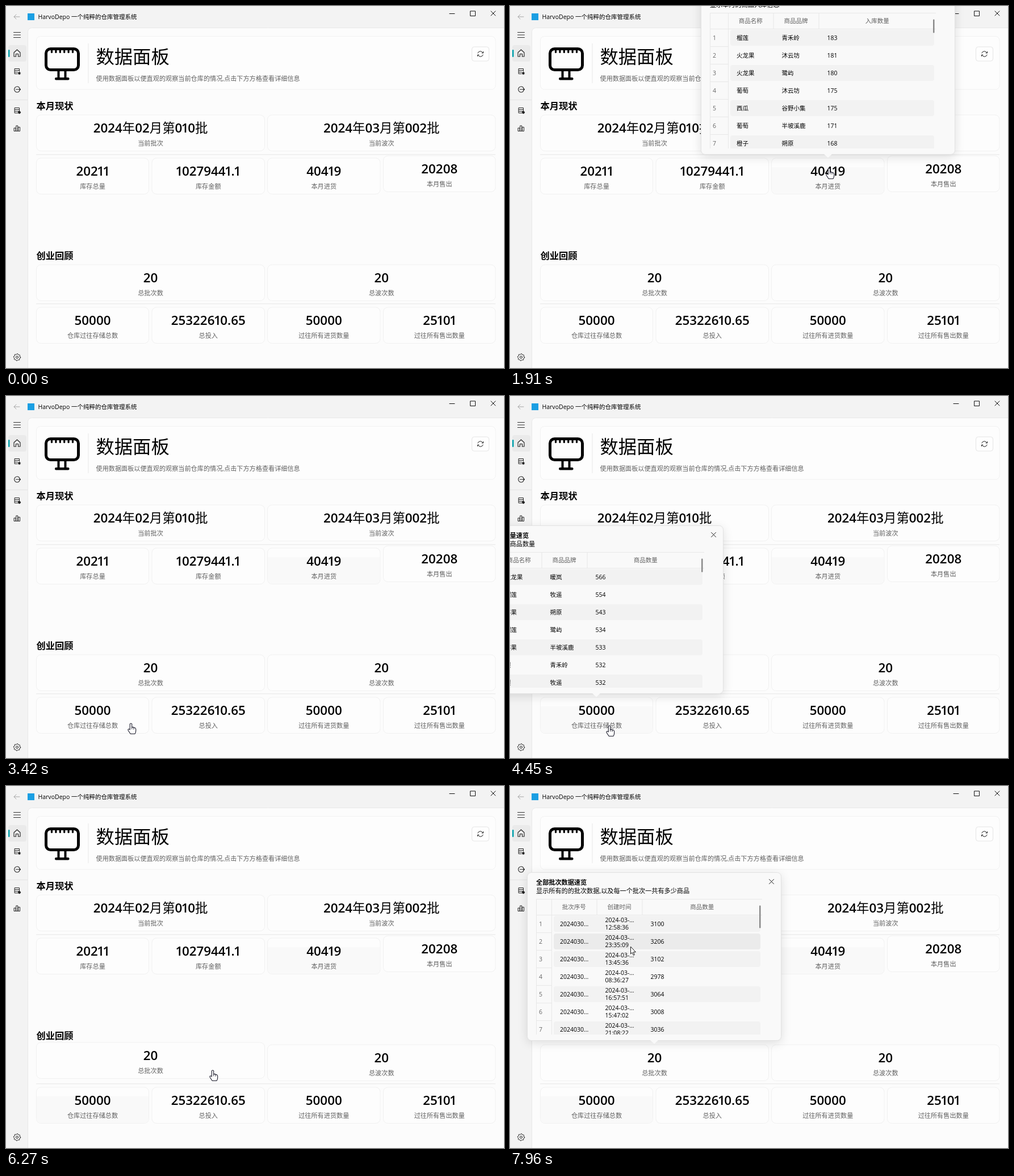
An HTML page with a canvas that plays this animation: 877 px wide and 638 px high, repeating every 8 s.

```html
<!DOCTYPE html>
<html lang="zh-CN">
<head>
<meta charset="utf-8">
<title>仓库面板</title>
<style>
html, body { margin: 0; width: 100%; height: 100%; overflow: hidden; background: #f3f3f3; }
canvas { display: block; }
</style>
</head>
<body>
<canvas id="stage" width="877" height="638"></canvas>
<script>
const ctx = document.getElementById('stage').getContext('2d');
const LOOP = 8000;
const FONT = '"Open Sans", "Noto Sans CJK SC", "Noto Sans CJK", sans-serif';
const GREY = '#606060';

const clamp = v => Math.max(0, Math.min(1, v));
const smooth = u => u * u * (3 - 2 * u);
const within = (x, y, bx, by, w, h) => x >= bx && x < bx + w && y >= by && y < by + h;

// ---- data ----
const card = (x, y, w, value, label, extra) => ({ x, y, w, h: 63.5, value, label, base: 0, ...extra });
const cards = [
  card(53.5, 192, 402, '2024年02月第010批', '当前批次', { lift: [5710, 5880] }),
  card(460.5, 192, 401.5, '2024年03月第002批', '当前波次'),
  card(53.5, 268, 198, '20211', '库存总量'),
  card(257, 268, 198.5, '10279441.1', '库存金额'),
  card(460.5, 268, 198.5, '40419', '本月进货', { lift: [1300, 1730], shade: [1300, LOOP, 16] }),
  card(664.5, 268, 197.5, '20208', '本月售出', { base: 4 }),
  card(53.5, 456, 402, '20', '总批次数', { lift: [6110, 6420], shade: [6420, 7010, 5] }),
  card(460.5, 456, 401.5, '20', '总波次数'),
  card(53.5, 531, 198, '50000', '仓库过往存储总数', { lift: [3440, 4270], shade: [4030, LOOP, 16] }),
  card(257, 531, 198.5, '25322610.65', '总投入'),
  card(460.5, 531, 198.5, '50000', '过往所有进货数量'),
  card(664.5, 531, 197.5, '25101', '过往所有售出数量')
];

const split = s => s.split(' ').map(r => r.split('|'));
const popups = [
  {
    x: 336, y: -35, from: 1725, to: 3040, side: 48, thumb: 24,
    title: '本月进货数据速览', note: '显示本月的商品入库信息',
    heads: ['商品名称', '商品品牌', '入库数量'],
    rows: split('榴莲|青禾岭|183 火龙果|沐云坊|181 火龙果|鹭屿|180 葡萄|沐云坊|175 西瓜|谷野小集|175 葡萄|半坡溪鹿|171 橙子|朔原|168')
  },
  {
    x: -72, y: 228, from: 4265, to: 5710, side: 48, thumb: 24,
    title: '仓库存储数量速览', note: '显示仓库的商品数量',
    heads: ['商品名称', '商品品牌', '商品数量'],
    rows: split('火龙果|暖岚|566 榴莲|牧遥|554 苹果|朔原|543 榴莲|鹭屿|534 苹果|半坡溪鹿|533 梨|青禾岭|532 梨|牧遥|532')
  },
  {
    x: 30, y: 152, from: 6415, to: LOOP, side: 43, thumb: 40,
    title: '全部批次数据速览', note: '显示所有的的批次数据,以及每一个批次一共有多少商品',
    heads: ['批次序号', '创建时间', '商品数量'],
    rows: split('12:58:36|3100 23:35:09|3206 13:45:36|3102 08:36:27|2978 16:57:51|3064 15:47:02|3008 21:08:22|3036')
      .map(([time, n]) => ['2024030...', '2024-03-...\n' + time, n])
  }
];
const PW = 448, PH = 297;

// start, end, then the three points of a curve
const moves = [
  [360, 930, 676, 640, 405, 490, 555, 350],
  [1230, 1420, 555, 350, 566, 318, 562, 286],
  [2250, 2620, 562, 286, 640, 90, 768, 3],
  [3040, 3420, 768, 3, 520, 330, 220, 577],
  [3430, 3610, 220, 577, 200, 600, 175, 581],
  [4880, 5580, 175, 581, 375, 510, 355, 240],
  [5710, 6270, 356, 240, 515, 360, 364, 501],
  [6980, 7770, 364, 501, 362, 330, 201, 241],
  [7860, 7960, 201, 241, 204, 262, 212, 283]
];

// ---- drawing helpers ----
function text(s, x, cy, size, color = '#000', align = 'left', weight = 400) {
  ctx.font = `${weight} ${size}px ${FONT}`;
  ctx.fillStyle = color;
  ctx.textAlign = align;
  ctx.fillText(s, x, cy + size * 0.37);
}

function box(x, y, w, h, r, fill, stroke) {
  ctx.beginPath();
  ctx.roundRect(x, y, w, h, r);
  if (fill) { ctx.fillStyle = fill; ctx.fill(); }
  if (stroke) { ctx.strokeStyle = stroke; ctx.lineWidth = 1; ctx.stroke(); }
}

function bar(x, y, w, h, fill) {
  ctx.fillStyle = fill;
  ctx.fillRect(x, y, w, h);
}

function path(d, x, y, stroke, width = 1, fill) {
  const p = new Path2D(d);
  ctx.save();
  ctx.translate(x, y);
  ctx.lineJoin = ctx.lineCap = 'round';
  if (fill) { ctx.fillStyle = fill; ctx.fill(p); }
  if (stroke) { ctx.strokeStyle = stroke; ctx.lineWidth = width; ctx.stroke(p); }
  ctx.restore();
}

// Proportional figures: a narrow 1, lighter ideographs
function figures(s, cx, cy) {
  const size = 22.4;
  const glyphs = [...s].map(ch => {
    const font = `${ch > '~' ? 500 : 600} ${size}px ${FONT}`;
    ctx.font = font;
    return { ch, font, w: ctx.measureText(ch).width * (ch === '1' ? 0.77 : 1) };
  });
  let x = cx - glyphs.reduce((sum, g) => sum + g.w, 0) / 2;
  ctx.fillStyle = '#000';
  ctx.textAlign = 'center';
  for (const g of glyphs) {
    ctx.font = g.font;
    ctx.fillText(g.ch, x + g.w / 2, cy + size * 0.36);
    x += g.w;
  }
}

// ---- window ----
function gear(x, y, r, fill) {
  let d = '';
  for (let i = 0; i < 32; i++) {
    const a = i / 32 * Math.PI * 2, k = i % 4 < 2 ? r : r * 0.8;
    d += (i ? 'L' : 'M') + (Math.cos(a) * k).toFixed(2) + ' ' + (Math.sin(a) * k).toFixed(2);
  }
  path(d + 'Z', x, y, '#222', 1, fill);
}

function stack(y) {
  path('M-4.5-4.5H3.5V4.5H-4.5ZM-4.5-1.5H3.5M-4.5 1.5H3.5', 20, y, '#222');
}

function sidebar() {
  path('M5 0H-5M-1-4L-5 0L-1 4', 19, 19, '#a5a5a5');
  path('M-6-4.5H6M-6 0H6M-6 4.5H6', 19.5, 51, '#333');
  box(4, 69, 32, 29, 4, '#eaeaea');
  box(4, 77, 2.5, 13, 1.2, '#009faa');
  path('M-5.5-1L0-6L5.5-1V6H2V1.5H-2V6H-5.5Z', 19.5, 83, '#222', 1.1);
  stack(115);
  path('M2.8 0A2.8 2.8 0 1 1-2.8 0A2.8 2.8 0 1 1 2.8 0Z', 23.5, 118.5, '#f3f3f3', 1, '#222');
  path('M4-3.2A5 5 0 1 0 4 3.2M-2 0H6M4-2L6 0L4 2', 19.5, 147, '#222', 1.1);
  bar(0, 165, 38, 1, '#e3e3e3');
  stack(184);
  gear(23.5, 187.5, 2.2, '#222');
  path('M-5-1H-2.4V4.5H-5ZM-1.3-5H1.3V4.5H-1.3ZM2.4-2.5H5V4.5H2.4Z', 19.5, 216, '#222');
  gear(19.5, 619, 6.2);
  path('M2 0A2 2 0 1 1-2 0A2 2 0 1 1 2 0Z', 19.5, 619, '#222');
}

function monitor() {
  ctx.strokeStyle = '#000';
  ctx.lineWidth = 5;
  ctx.beginPath();
  ctx.roundRect(70.5, 75.5, 57, 37, 8);
  ctx.stroke();
  for (let i = 0; i < 6; i++) path('M0 0V5', 80.5 + i * 7.4, 76.5, '#000', 3.2);
  bar(90.5, 113, 4, 15, '#000');
  bar(102.5, 113, 4, 15, '#000');
  box(86, 126, 25.5, 4.5, 2, '#000');
}

function chrome() {
  bar(0, 0, 877, 638, '#f3f3f3');
  box(38.5, 38.5, 860, 620, 7, '#fcfcfc', '#e9e9e9');
  bar(38, 13, 12, 12, '#1b9fe3');
  text('HarvoDepo 一个纯粹的仓库管理系统', 56.5, 19, 10.5);
  path('M-4.5 0H4.5', 785.5, 13.5, '#111');
  path('M-4-4H4.5V4.5H-4Z', 822, 13, '#111');
  path('M-4-4L4 4M4-4L-4 4', 858, 13, '#111');
  sidebar();

  box(53.5, 53.5, 808.5, 93.5, 7, '#fdfdfd', '#f2f2f2');
  monitor();
  bar(144.5, 66, 1, 70, '#e8e8e8');
  text('数据面板', 158.5, 89, 32.3);
  text('使用数据面板以便直观的观察当前仓库的情况,点击下方方格查看详细信息', 158.5, 128, 11.15, GREY);
  box(820.5, 72, 30, 25, 4, '#fefefe', '#e5e5e5');
  path('M-4.6-1.5A4.8 4.8 0 0 1 4.3-2M4.6 1.5A4.8 4.8 0 0 1-4.3 2M5-4V-1.6H2.6M-5 4V1.6H-2.6', 835.5, 84.5, '#222');

  text('本月现状', 53.5, 176, 16.3, '#000', 'left', 600);
  text('创业回顾', 53.5, 440, 16.3, '#000', 'left', 600);
  bar(53, 261, 809, 1.5, '#eeeeee');
  bar(53, 524, 809, 1.5, '#eeeeee');
}

function drawCard(c, t) {
  let up = c.base;
  if (c.lift) up += 4 * smooth(clamp((t - c.lift[0]) / 110)) * (1 - smooth(clamp((t - c.lift[1]) / 110)));
  const y = c.y - up, cx = c.x + c.w / 2;
  box(c.x, y, c.w, c.h, 8, '#fdfdfd', '#f1f1f1');
  if (c.shade && t >= c.shade[0] && t < c.shade[1]) {
    const top = c.shade[2];
    box(c.x + 0.5, y + top, c.w - 1, c.h - top - 0.5, [0, 0, 8, 8], '#f9f9f9');
  }
  figures(c.value, cx, y + 23.3);
  text(c.label, cx, y + 49.5, 11.15, GREY, 'center');
}

// ---- popups ----
const isOpen = (p, t) => t >= p.from && t < p.to;

function drawPopup(p, t, mouse) {
  const u = clamp((t - p.from) / 180), k = u * (2 - u);
  const cols = [p.side, p.side + 79.5, p.side + 159.5, 414];
  ctx.save();
  ctx.globalAlpha = k;
  ctx.translate(p.x, p.y + Math.round(8 * (1 - k)));

  ctx.shadowColor = 'rgba(0,0,0,.13)';
  ctx.shadowBlur = 18;
  ctx.shadowOffsetY = 4;
  box(0.5, 0.5, PW - 1, PH - 1, 7, '#f9f9f9');
  ctx.shadowColor = 'transparent';
  box(0.5, 0.5, PW - 1, PH - 1, 7, null, '#e2e2e2');
  path('M-7 0L0 6.5L7 0Z', 224, PH - 1, null, 1, '#f9f9f9');

  text(p.title, 16, 18, 11.15, '#000', 'left', 700);
  text(p.note, 16, 33, 11.15);
  path('M-4-4L4 4M4-4L-4 4', 430.5, 16.5, '#222');

  ctx.beginPath();
  ctx.rect(16, 46, 400, 240);
  ctx.clip();
  const line = '#e8e8e8';
  bar(16, 47, 398, 1, line);
  bar(16, 75, 398, 1, line);
  bar(16, 47, 1, 240, line);
  bar(p.side, 47, 1, 240, line);
  p.heads.forEach((h, i) => {
    if (i) bar(cols[i], 47, 1, 28, line);
    text(h, (cols[i] + cols[i + 1]) / 2, 61, 10.5, GREY, 'center');
  });
  p.rows.forEach((row, i) => {
    const y = 75 + i * 31, mid = y + 15.7;
    const hot = mouse && within(mouse.x - p.x, mouse.y - p.y, p.side, y + 1, 366, 31);
    if (hot || i % 2 === 0) box(p.side + 4, y + 2, 411 - p.side - 4, 28, 4, hot ? '#ebebeb' : '#f2f2f2');
    bar(16, y + 31, p.side - 16, 1, line);
    text(String(i + 1), 21, mid, 10.5, '#666');
    row.forEach((cell, j) => {
      const parts = cell.split('\n');
      parts.forEach((s, n) => text(s, cols[j] + 15, mid + (n - (parts.length - 1) / 2) * 13.4, 10.5));
    });
  });
  box(409, 58.5, 2.5, p.thumb, 1.2, '#8a8a8a');
  ctx.restore();
}

// ---- pointer ----
function pointer(t) {
  let m = null;
  for (const move of moves) if (t >= move[0]) m = move;
  if (!m) return null;
  const [a, b, x0, y0, x1, y1, x2, y2] = m;
  const u = smooth(clamp((t - a) / (b - a))), v = 1 - u;
  return {
    x: Math.round(v * v * x0 + 2 * u * v * x1 + u * u * x2),
    y: Math.round(v * v * y0 + 2 * u * v * y1 + u * u * y2)
  };
}

const ARROW = 'M.5.5V13L3.3 10.4L5.4 15.3L7.3 14.5L5.3 9.7H9Z';
const HAND = 'M-1.7 11V1.5Q-1.7 0 0 0Q1.7 0 1.7 1.5V7Q4.8 5.9 5 7.7Q7.9 7 8 9Q8.7 9.3 8.7 10.5V13Q8.6 16 7 18.5H-.8L-4.9 12.2Q-5.6 10.6-4.4 10Q-3 9.7-1.7 11Z';

function drawPointer(mouse, open) {
  const covered = open.some(p => within(mouse.x, mouse.y, p.x, p.y, PW, PH));
  const onCard = cards.some(c => within(mouse.x, mouse.y, c.x, c.y, c.w, c.h));
  if (onCard && !covered) {
    path(HAND, mouse.x, mouse.y, '#1a1a2a', 1.1, '#fff');
    path('M1.7 7V10M5 8V10.5', mouse.x, mouse.y, '#1a1a2a', 0.9);
  } else {
    path(ARROW, mouse.x, mouse.y, '#1a1a1a', 1, '#fff');
  }
}

function draw() {
  const t = performance.now() % LOOP;
  const mouse = pointer(t);
  const open = popups.filter(p => isOpen(p, t));
  chrome();
  cards.forEach(c => drawCard(c, t));
  open.forEach(p => drawPopup(p, t, mouse));
  if (mouse) drawPointer(mouse, open);
  requestAnimationFrame(draw);
}
draw();
</script>
</body>
</html>
```
